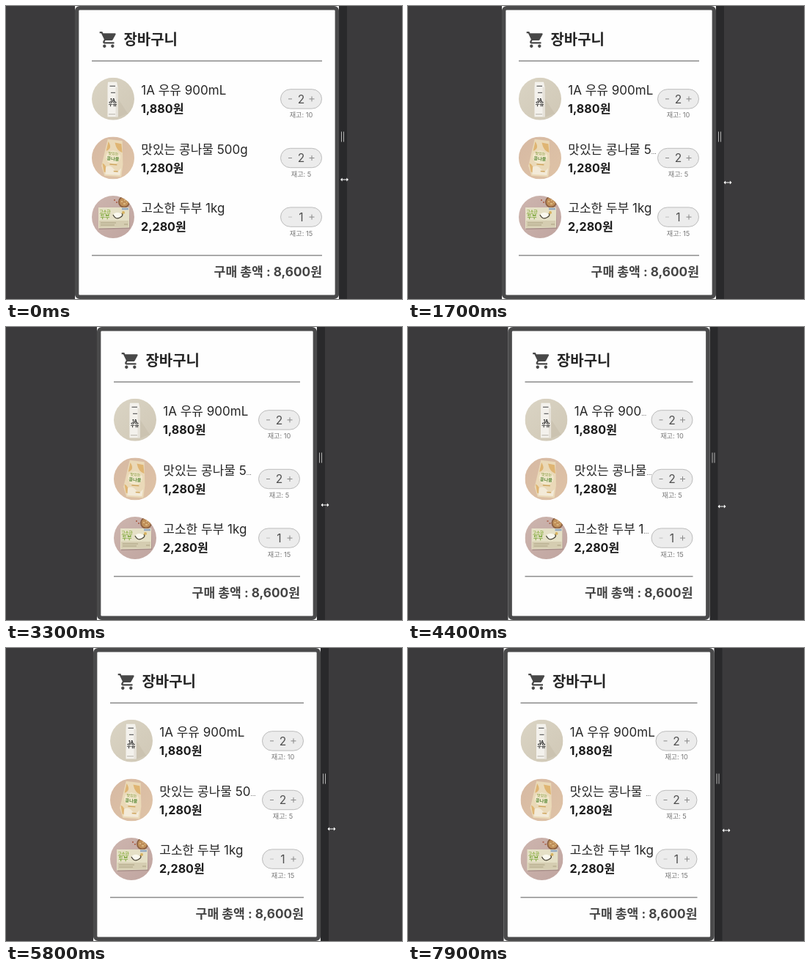
An HTML page that plays this animation: 540 px wide and 400 px high, repeating every 8 s.

```html
<!DOCTYPE html>
<html lang="ko">
<head>
<meta charset="utf-8">
<title>장바구니</title>
<style>
  html, body { margin: 0; width: 100%; height: 100%; overflow: hidden; background: #3b3a3c; }
  svg { display: block; width: 540px; height: 400px; }
  text { font-family: Inter, "Noto Sans CJK KR", "Noto Sans CJK", sans-serif; white-space: pre; }
  .title { font-size: 20px; font-weight: 700; fill: #252525; }
  .name { font-size: 17px; fill: #262626; }
  .price { font-size: 16.1px; font-weight: 700; fill: #1c1c1c; }
  .count { font-size: 15.6px; fill: #505050; text-anchor: middle; }
  .stock { font-size: 9.2px; fill: #777; text-anchor: middle; }
  .total { font-size: 17.2px; font-weight: 700; fill: #444; text-anchor: end; }
  .pack { text-anchor: middle; font-weight: 700; }
</style>
</head>
<body>
<svg id="stage" viewBox="0 0 540 400" xmlns="http://www.w3.org/2000/svg">
  <defs>
    <clipPath id="disc"><circle r="29"/></clipPath>
    <linearGradient id="sand" x2="1" y2="1"><stop stop-color="#dad4c4"/><stop offset="1" stop-color="#d0c8b6"/></linearGradient>
    <linearGradient id="peach" x2="1" y2="1"><stop stop-color="#d6b9a3"/><stop offset="1" stop-color="#dfc3a6"/></linearGradient>
    <linearGradient id="rose" x2="1" y2="1"><stop stop-color="#cdb5ae"/><stop offset="1" stop-color="#c0a5a0"/></linearGradient>
  </defs>
  <rect width="540" height="400" fill="#3b3a3c"/>
  <rect id="strip" width="11" height="400" fill="#29292b"/>
  <rect id="page" height="400" fill="#f2f2f2"/>
  <rect id="frame" y="2.75" height="394.5" rx="4" fill="#fefefe" stroke="#4a4a4b" stroke-width="5.5"/>
  <g id="rules" stroke="#8a8a8a" stroke-width="1.3"><line y1="75" y2="75"/><line y1="340.5" y2="340.5"/></g>
  <g id="left">
    <path transform="translate(9.6 32.8) scale(1.1)" fill="#484848" d="M7 18c-1.1 0-2 .9-2 2s.9 2 2 2 2-.9 2-2-.9-2-2-2zM1 2v2h2l3.6 7.6-1.35 2.44c-.16.28-.25.61-.25.96 0 1.1.9 2 2 2h12v-2H7.42c-.14 0-.25-.11-.25-.25l.03-.12.9-1.63h7.45c.75 0 1.41-.41 1.75-1.03l3.58-6.49A1 1 0 0 0 20 4H5.21l-.94-2H1zM17 18c-1.1 0-2 .9-2 2s.9 2 2 2 2-.9 2-2-.9-2-2-2z"/>
    <text class="title" x="43.4" y="53">장바구니</text>
  </g>
  <g id="right"><text class="total" y="369">구매 총액 : 8,600원</text></g>
  <g id="handle" stroke="#b5b5b5"><path d="M-1.5 171.5v14M1.5 171.5v14"/></g>
  <path id="cursor" d="M-5.5 0l2.6-2.4v1.8h5.8v-1.8l2.6 2.4-2.6 2.4v-1.8h-5.8v1.8z" fill="#fff"/>
</svg>
<script>
const LOOP = 8000, STEP = 100, CENTER = 274, PITCH = 80.6;
const $ = id => document.getElementById(id);

const milk = `
  <rect x="-29" y="-29" width="58" height="58" fill="url(#sand)"/>
  <path d="M7 0L20 20 7 25z" fill="#bdb4a2" opacity=".35"/>
  <path d="M-7-23H5L6.5-16V24.5H-7.5V-16z" fill="#f3f1ec"/>
  <path d="M3.5-16H6.5V24.5H3.5z" fill="#e6e2d9"/>
  <path d="M-4.5-17.5H3M-3-8.5H3" stroke="#666" stroke-width="1.2"/>
  <text class="pack" x="-.5" y="4" font-size="6" fill="#1c1c1c">1A</text>
  <text class="pack" x="-.5" y="9.5" font-size="6.3" fill="#1c1c1c">우유</text>
  <path d="M-6 21H3" stroke="#b5b1a8" stroke-width="1"/>`;

const sprouts = `
  <rect x="-29" y="-29" width="58" height="58" fill="url(#peach)"/>
  <g transform="rotate(4)">
    <path d="M-9-25L11-24 14 8 13 25-10 25-15 12z" fill="#ead9b8"/>
    <path d="M-8-22Q-1-13-10-9zM1-21L10-20 12-8Q4-10 1-21zM-14 8Q-8 10-6 21L-11 20z" fill="#dfb573"/>
    <ellipse cy="-1" rx="10" ry="9" fill="#f2e8cc"/>
    <path d="M-9 13Q-3 9 2 15T12 13L11 23-9 23z" fill="#f3ead8"/>
    <text class="pack" y="-4" font-size="5.2" fill="#9aa659">맛있는</text>
    <text class="pack" y="3.5" font-size="6.2" fill="#5f8b3c">콩나물</text>
    <path d="M-4 9H6M2 18H8" stroke="#cfa65f" stroke-width="1.5"/>
  </g>`;

const tofu = `
  <rect x="-29" y="-29" width="58" height="58" fill="url(#rose)"/>
  <circle cx="15" cy="-20.5" r="8" fill="#8c6142"/>
  <circle cx="15" cy="-20.5" r="6.2" fill="#c0905a"/>
  <path d="M11-21h2M15-23h2M14-18h3M18-20h1" stroke="#e4c48d" stroke-width="1.6"/>
  <path d="M1-23h2M4-20h2" stroke="#a9583f" stroke-width="1.6"/>
  <path d="M-19-10L22-10 23 16-19 17z" fill="#a88f89"/>
  <path d="M-20-13L22-13 22 14.5-20 15.5z" fill="#e5e0c6"/>
  <path d="M-19 5L21 5 21 13.5-19 14.5z" fill="#d5cdb1"/>
  <text class="pack" x="-11" y="-5" font-size="5.5" fill="#8baf42">고소한</text>
  <text class="pack" x="-11" y="1.5" font-size="7" fill="#76a433">두부</text>
  <ellipse cx="6" cy="-2" rx="6" ry="4" fill="#faf8ee"/>
  <path d="M0-3Q3 4 9 1T12-5" fill="none" stroke="#4b4638" stroke-width="1.3"/>
  <circle cx="14" cy="-6" r="2" fill="#d7b260"/>
  <path d="M12-11h9" stroke="#93a9c2" stroke-width="2.5"/>
  <path d="M-17 8H4M-17 11H2M15 10h5" stroke="#aaa080" stroke-width="1"/>`;

const items = [
  { name: "1A 우유 900mL", price: "1,880원", count: 2, stock: 10, art: milk },
  { name: "맛있는 콩나물 500g", price: "1,280원", count: 2, stock: 5, art: sprouts },
  { name: "고소한 두부 1kg", price: "2,280원", count: 1, stock: 15, art: tofu }
];

items.forEach((item, i) => {
  const y = i * PITCH;
  $("left").insertAdjacentHTML("beforeend", `
    <g transform="translate(29 ${126.8 + y})" clip-path="url(#disc)">${item.art}</g>
    <text class="name" id="name${i}" x="67.3" y="${120.9 + y}"></text>
    <text class="price" x="67" y="${146.1 + y}">${item.price}</text>`);
  $("right").insertAdjacentHTML("beforeend", `
    <g transform="translate(-28.5 ${126.9 + y})">
      <rect x="-28" y="-13.2" width="56" height="26.4" rx="13.2" fill="#ececec" stroke="#bcbcbc"/>
      <path d="M-17.5 0h5" stroke="${item.count > 1 ? "#888" : "#c2c2c2"}"/>
      <path d="M11 0h7M14.5-3.5v7" stroke="#888"/>
      <text class="count" y="5.6">${item.count}</text>
      <text class="stock" y="25.5">재고: ${item.stock}</text>
    </g>`);
});

// Approximate advances at the product name size
const advances = { " ": 4.6, 1: 7.6, A: 11.6, m: 15.4, L: 9.2, k: 8.6, g: 9.6 };
const ELLIPSIS = 5;
const advance = c => advances[c] || (c > "\u3000" ? 15.8 : 10.4);
const measure = s => [...s].reduce((sum, c) => sum + advance(c), 0);

function fit(name, room) {
  if (measure(name) <= room) return name;
  let cut = name;
  while (measure(cut) + ELLIPSIS > room) cut = cut.slice(0, -1);
  return `${cut}<tspan font-size="8" fill="#444">…</tspan>`;
}

// time, half content width, pointer lead, pointer height
const keys = [
  [0, 157, 30.5, 237], [400, 137, 32, 238], [800, 121, 35, 239],
  [1200, 115, 38, 240], [1700, 123, 39, 241], [2200, 135, 39, 242],
  [2700, 141, 38, 242], [3000, 136, 35, 243], [3300, 127, 34, 243],
  [3600, 121, 36, 244], [4100, 113, 38.5, 245], [4400, 114.5, 39.5, 245],
  [5000, 126.5, 39.5, 246], [5400, 132, 38.5, 247], [5800, 132, 38, 247],
  [6300, 123, 36.5, 247], [6600, 119.5, 38.5, 247], [7100, 116, 38.5, 248],
  [7900, 120.5, 39.5, 249]
];

const slope = (i, col) => {
  const a = keys[Math.max(i - 1, 0)], b = keys[Math.min(i + 1, keys.length - 1)];
  return (b[col] - a[col]) / (b[0] - a[0]);
};

function track(t, col) {
  const i = Math.max(0, keys.findIndex(k => k[0] >= t) - 1);
  const a = keys[i], b = keys[i + 1], span = b[0] - a[0], u = (t - a[0]) / span;
  const w = u * u * (3 - 2 * u);
  return a[col] * (1 - w) + b[col] * w
    + span * u * (1 - u) * ((1 - u) * slope(i, col) - u * slope(i + 1, col));
}

const move = (id, x, y = 0) => $(id).setAttribute("transform", `translate(${x} ${y})`);
const span = (el, x, width) => { el.setAttribute("x", x); el.setAttribute("width", width); };

function draw(time) {
  const t = Math.floor((time % LOOP) / STEP) * STEP;
  const half = Math.round(track(t, 1) * 2) / 2;
  const left = CENTER - half, right = CENTER + half;
  span($("page"), left - 23, 2 * half + 46);
  span($("frame"), left - 20.4, 2 * half + 40.8);
  for (const line of $("rules").children) {
    line.setAttribute("x1", left);
    line.setAttribute("x2", right);
  }
  move("left", left);
  move("right", right);
  move("strip", right + 23);
  move("handle", right + 28);
  move("cursor", right + track(t, 2), track(t, 3));
  items.forEach((item, i) => { $("name" + i).innerHTML = fit(item.name, 2 * half - 124.5); });
}

const start = performance.now();
function tick() {
  draw(performance.now() - start);
  requestAnimationFrame(tick);
}
tick();
</script>
</body>
</html>
```
